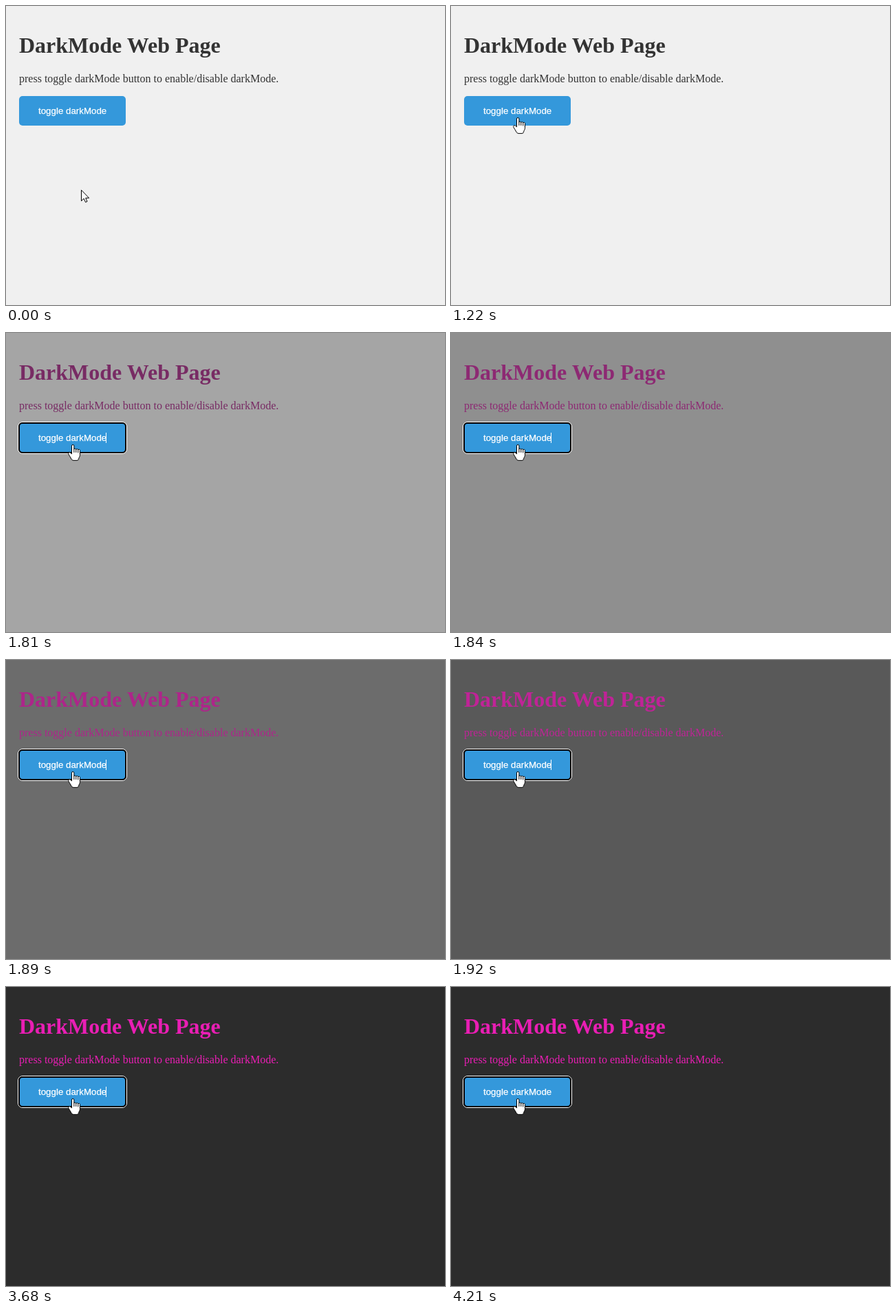
An HTML page that plays this animation: 638x435 px, repeating every 4290 ms.

```html
<!DOCTYPE html>
<html lang="en">
<head>
<meta charset="utf-8">
<title>Dark mode toggle</title>
<style>
  html, body { margin: 0; width: 100%; height: 100%; overflow: hidden; }
  svg { display: block; width: 638px; height: 435px; }
  .serif { font-family: "Liberation Serif", "Times New Roman", serif; }
  .sans { font-family: "Liberation Sans", Arial, sans-serif; }
</style>
</head>
<body>
<svg viewBox="0 0 638 435" xmlns="http://www.w3.org/2000/svg">
  <rect id="page" width="638" height="435"/>
  <g id="copy" class="serif">
    <text x="19" y="68" font-size="32" font-weight="bold">DarkMode Web Page</text>
    <text x="19" y="111" font-size="16">press toggle darkMode button to enable/disable darkMode.</text>
  </g>
  <rect x="19" y="131" width="155" height="43" rx="5" fill="#3498db"/>
  <g id="ring" fill="none">
    <rect x="17.5" y="129.5" width="158" height="46" rx="6.5" stroke="#fff"/>
    <rect x="19" y="131" width="155" height="43" rx="5" stroke="#000" stroke-width="2"/>
  </g>
  <text class="sans" x="47" y="157" font-size="13.333" fill="#fff" stroke="#fff" stroke-width=".25">toggle darkMode</text>
  <rect id="caret" x="145" y="145" width="1" height="15" fill="#fff"/>
  <g id="arrow">
    <path d="M.5 .8V16.6L4.2 13.2L6.6 18.5L9 17.4L6.7 12.3H11.6Z" fill="#fff" stroke="#000" stroke-linejoin="round"/>
  </g>
  <g id="hand" stroke="#000" stroke-linejoin="round" stroke-linecap="round">
    <path d="M-1.5 13.5V2.2A1.7 1.7 0 0 1 1.9 2.2V7A1.6 1.6 0 0 1 4.8 7.5A1.6 1.6 0 0 1 7.8 8.2A1.5 1.5 0 0 1 10.5 9.5V15.5C10.5 18 8.8 19 8.5 21.5Q8.2 23.4 6 23.4H1Q-1 23.4 -2 21.3C-3 18.8 -5 16.8 -6.2 14.2C-7 12.2 -4.8 11 -3.4 12.2Z" fill="#fff"/>
    <path d="M1.9 7V11.5M4.8 7.5V11.5M7.8 8.5V12" fill="none"/>
  </g>
</svg>
<script>
const LOOP = 4290;
const el = id => document.getElementById(id);
const [page, copy, ring, caret, arrow, hand] =
  ["page", "copy", "ring", "caret", "arrow", "hand"].map(el);

const light = { page: [240, 240, 240], copy: [51, 51, 51] };
const dark = { page: [44, 44, 44], copy: [233, 30, 180] };

const mix = (a, b, k) => a + (b - a) * k;
const part = (t, from, to) => Math.min(1, Math.max(0, (t - from) / (to - from)));
const smooth = k => k * k * (3 - 2 * k);
const show = (node, on) => node.setAttribute("visibility", on ? "visible" : "hidden");
const move = (node, x, y) => node.setAttribute("transform", `translate(${Math.round(x)} ${Math.round(y)})`);
const color = (name, k) =>
  `rgb(${light[name].map((v, i) => Math.round(mix(v, dark[name][i], k))).join()})`;

// cubic-bezier(.42, 0, .58, 1), solved by bisection
function easeInOut(x) {
  let lo = 0, hi = 1;
  for (let i = 0; i < 20; i++) {
    const s = (lo + hi) / 2, r = 1 - s;
    if (1.26 * s * r * r + 1.74 * s * s * r + s * s * s < x) lo = s;
    else hi = s;
  }
  return smooth(lo);
}

function caretOn(t) {
  return t >= 1550 && t < 2090 || t >= 2620 && t < 3130 || t >= 3680 && t < 4210;
}

function draw(t) {
  const k = easeInOut(part(t, 1613, 2073));
  page.setAttribute("fill", color("page", k));
  copy.setAttribute("fill", color("copy", k));

  const x = mix(109, 97, smooth(part(t, 560, 860)));
  const y = mix(267, 167, smooth(part(t, 560, 1060))) - 5 * part(t, 1070, 1220);
  const over = y < 174;
  move(arrow, x, y);
  move(hand, x, y);
  show(arrow, !over);
  show(hand, over);

  show(ring, t >= 1550);
  show(caret, caretOn(t));
}

const start = performance.now();
function tick() {
  draw((performance.now() - start) % LOOP);
  requestAnimationFrame(tick);
}
tick();
</script>
</body>
</html>
```
